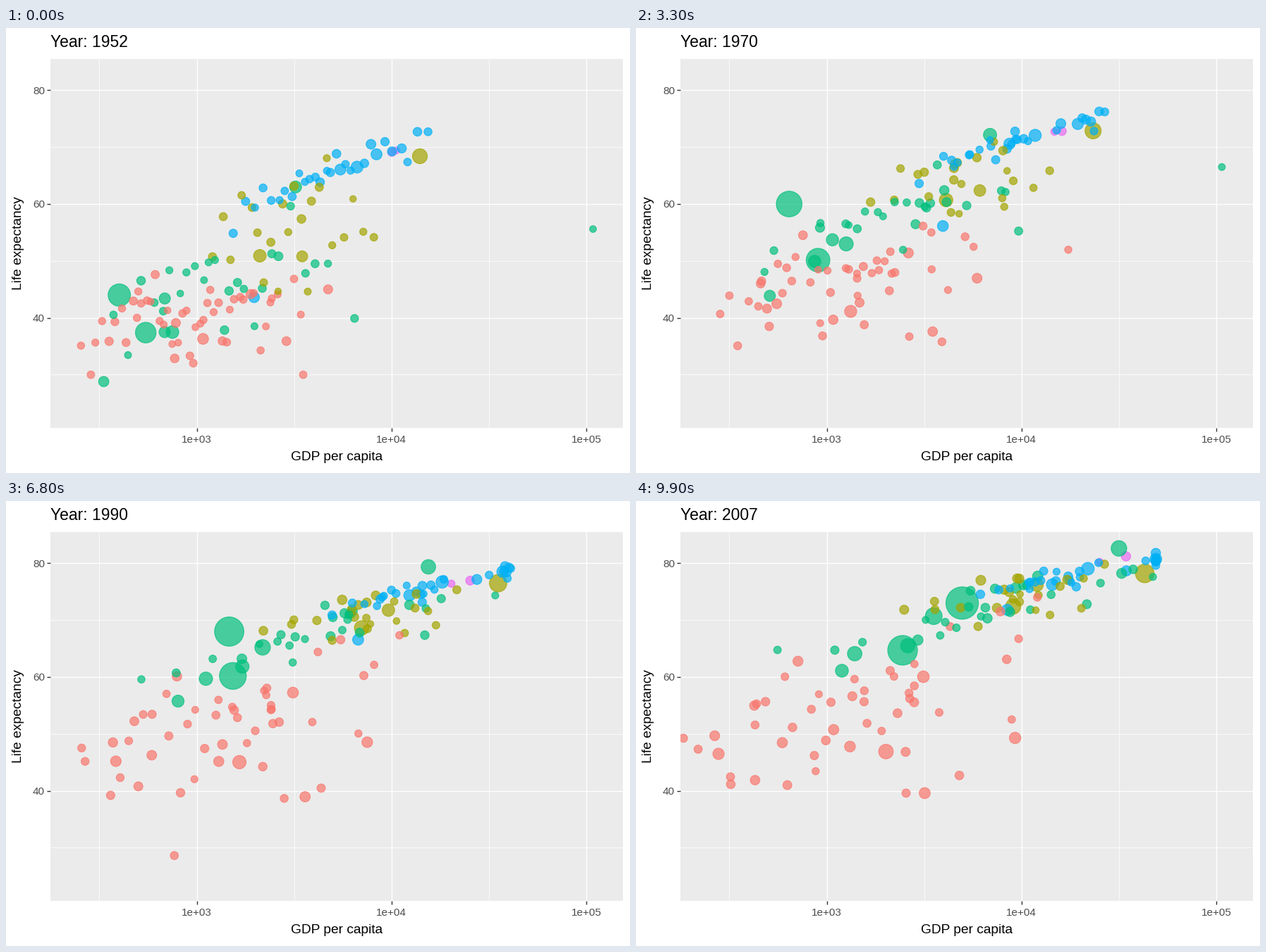
A matplotlib script for the animation above (10 s loop, 885x632 px).

```python
import numpy as np
import matplotlib.pyplot as plt
from matplotlib.animation import FuncAnimation
from matplotlib.colors import to_rgba

W, H, DPI = 885, 632, 64
PT = 72 / DPI                      # points per pixel
L, R, T, B = 63, 875, 43.5, 568    # panel edges in pixels
XLIM, YLIM = (2.2484, 5.1887), (20.65, 85.55)
FRAMES = 100
t = np.linspace(0, 1, FRAMES)
years = 1952 + 55 * t
KNOTS = [1952, 1962, 1972, 1982, 1992, 2007]
rng = np.random.default_rng(12)
bubbles = []                       # (draw rank, colour, radii, xs, ys)

plt.rcParams["font.family"] = "Liberation Sans"


def ease(p):
    return 1 - (1 - t) ** p


def radius(pop):
    return 4.3 + 18.5 * np.sqrt(pop / 1318)


def add(color, pop, growth, xs, ys, rank=None):
    r0, r1 = (radius(pop * g) for g in growth)
    bubbles.append((-pop if rank is None else rank, color, r0 + (r1 - r0) * t, xs, ys))


def steady(color, growth, px, py, pop, x0, y0, x1, y1, bump=0, rank=None):
    xs = x0 + (x1 - x0) * ease(px) + bump * np.sin(np.pi * t)
    add(color, pop, growth, xs, y0 + (y1 - y0) * ease(py), rank)


def bent(color, growth, pop, gdp, life):
    add(color, pop, growth, np.interp(years, KNOTS, np.log10(gdp)),
        np.interp(years, KNOTS, life))


def crowd(n, mid, spread, life, slope, noise, low, high):
    """Starting points scattered along a rising line, evenly filled in x."""
    u = np.linspace(-1, 1, n) + rng.uniform(-.5, .5, n) / n
    x = mid + spread * (u + .4 * u ** 3)
    y = life + slope * (x - mid) + noise * rng.normal(size=n)
    return x, np.clip(y, low, high)


def people(n, median, top):
    return np.minimum(median * np.exp(rng.normal(size=n)), top)


def group(color, growth, px, py, start, end, pops, known=(), bump=0, rank=None):
    """Known bubbles (population, then income and life at both ends) and a crowd."""
    for pop, g0, l0, g1, l1 in known:
        steady(color, growth, px, py, pop, np.log10(g0), l0, np.log10(g1), l1,
               0, rank)
    if start:
        for row in zip(pops, start[0], start[1], *end):
            steady(color, growth, px, py, *row, bump=bump)


# Africa: slow gains, a hump in income around 1980, wide spread at the end
AFRICA, GROW_AF = "#F8766D", (.6, 1.9)
n = 46
x, y = crowd(n, 2.97, .4, 39.5, 5, 4, 30, 52)
gain = np.clip(.15 + .3 * (x - 2.97) + rng.normal(0, .2, n), -.25, .7)
y1 = np.clip(y + 14.5 + 16 * (gain - .15) + rng.normal(0, 4.5, n), 39.6, 76.4)
group(AFRICA, GROW_AF, 1, 1.5, (x, y), (x + gain, y1), people(n, 5, 35), [
    (74, 1077, 36.3, 2014, 46.9),
    (28, 781, 39.1, 278, 46.5),
    (29, 4725, 45, 9270, 49.3),
    (7, 3521, 30, 4797, 42.7),
], bump=.08)
bent(AFRICA, GROW_AF, 3, [2388, 6757, 21011, 17364, 9640, 12057],
     [42.7, 47.8, 52.8, 62.2, 68.8, 74])
bent(AFRICA, GROW_AF, 5.5, [493, 597, 591, 882, 737, 863],
     [40, 43, 44.6, 46.2, 23.6, 46.2])

# Americas
n = 22
x, y = crowd(n, 3.49, .3, 54, 18, 6, 37.6, 68.8)
x1 = x + np.clip(rng.normal(.45, .14, n), .1, .8)
y1 = np.clip(73.5 + 7 * (x1 - 3.9) + rng.normal(0, 2, n), 61, 80.7)
group("#A3A500", (.65, 1.33), 1.5, 1.5, (x, y), (x1, y1), people(n, 6, 30), [
    (230, 13990, 68.4, 42952, 78.2),
    (125, 2109, 50.9, 9066, 72.4),
    (72, 3478, 50.8, 11978, 76.2),
])

# Asia
ASIA, GROW_AS = "#00BF7D", (.57, 1.5)
n = 25
x, y = crowd(n, 3.1, .42, 45.5, 13, 6, 28.8, 65.4)
x1 = x + np.clip(rng.normal(.65, .3, n), .1, 1.35)
x1 = np.minimum(x1, 4.67)
y1 = np.clip(70 + 11 * (x1 - 3.6) + rng.normal(0, 2.5, n), 58, 82.2)
group(ASIA, GROW_AS, 1, 1.55, (x, y), (x1, y1), people(n, 10, 60), [
    (720, 547, 37.4, 2452, 64.7),
    (117, 3217, 63, 31656, 82.6),
    (150, 750, 37.5, 3541, 70.7),
    (90, 684, 37.5, 1391, 64.1),
    (88, 685, 43.4, 2606, 65.5),
    (11, 6460, 39.9, 21655, 72.8),
])
bent(ASIA, GROW_AS, 900, [400, 488, 677, 962, 1656, 4959],
     [44, 44.5, 63.1, 65.5, 68.7, 73])
bent(ASIA, GROW_AS, 1.5, [108382, 95458, 109348, 31354, 34933, 47307],
     [55.6, 60.5, 67.7, 71.3, 75.2, 77.6])

# Europe: a tight band that moves up together
n = 29
x, y = crowd(n, 3.69, .36, 65.2, 14, 1.8, 53.8, 72.7)
x1 = np.clip(x + rng.normal(.62, .13, n), 3.77, 4.69)
y1 = np.clip(77 + 7 * (x1 - 4.15) + rng.normal(0, .9, n), 72, 81.8)
pops = people(n, 9, 78)
pops[16:24:3] = 55, 78, 56
group("#00B0F6", (.85, 1.08), 1.6, 1.45, (x, y), (x1, y1), pops,
      [(47, 1969, 43.6, 8458, 71.8)])

# Oceania, behind everything
group("#E76BF3", (.62, 1.36), 1.2, .9, None, None, None, [
    (15, 10040, 69.1, 34435, 81.2),
    (3, 10557, 69.4, 25185, 80.2),
], rank=-1e4)

bubbles.sort(key=lambda b: b[0])
_, colors, radii, xs, ys = zip(*bubbles)
radii, xs, ys = map(np.array, (radii, xs, ys))
rgba = [to_rgba(c, .7) for c in colors]

fig = plt.figure(figsize=(W / DPI, H / DPI), dpi=DPI, facecolor="white")
ax = fig.add_axes([L / W, 1 - B / H, (R - L) / W, (B - T) / H], facecolor="#EBEBEB")
ax.set(xlim=XLIM, ylim=YLIM)
ax.spines[:].set_visible(False)
ax.set_xticks([3, 4, 5], [""] * 3)
ax.set_yticks([40, 60, 80], [""] * 3)
ax.set_xticks([2.5, 3.5, 4.5], minor=True)
ax.set_yticks([30, 50, 70], minor=True)
ax.set_axisbelow(True)
ax.grid(which="major", color="white", lw=1.4 * PT)
ax.grid(which="minor", color="white", lw=.7 * PT)
ax.tick_params(which="major", length=4.8 * PT, width=1.4 * PT, color="#333333")
ax.tick_params(which="minor", length=0)


def label(x, y, text, px, color="black", va="baseline", **kw):
    return fig.text(x / W, 1 - y / H, text, fontsize=px * PT, color=color, va=va, **kw)


for k in (3, 4, 5):
    px = L + (k - XLIM[0]) / (XLIM[1] - XLIM[0]) * (R - L)
    label(px, 589, f"1e+{k:02d}", 15.3, "#4D4D4D", ha="center")
for v in (40, 60, 80):
    py = B - (v - YLIM[0]) / (YLIM[1] - YLIM[0]) * (B - T)
    label(55, py + 5.5, str(v), 15.3, "#4D4D4D", ha="right")
label(469, 614, "GDP per capita", 19.1, ha="center")
label(18, 305.5, "Life expectancy", 19.1, va="center", ha="center", rotation=90)
title = label(63, 27, "", 22.9)

dots = ax.scatter(xs[:, 0], ys[:, 0], facecolors=rgba, edgecolors=rgba,
                  linewidths=1.2 * PT, zorder=3)


def update(i):
    dots.set_offsets(np.column_stack([xs[:, i], ys[:, i]]))
    dots.set_sizes((2 * PT * radii[:, i]) ** 2)
    title.set_text(f"Year: {round(years[i])}")
    return dots, title


anim = FuncAnimation(fig, update, frames=FRAMES, interval=100, repeat=True,
                     repeat_delay=0, blit=False)
plt.show()
```
